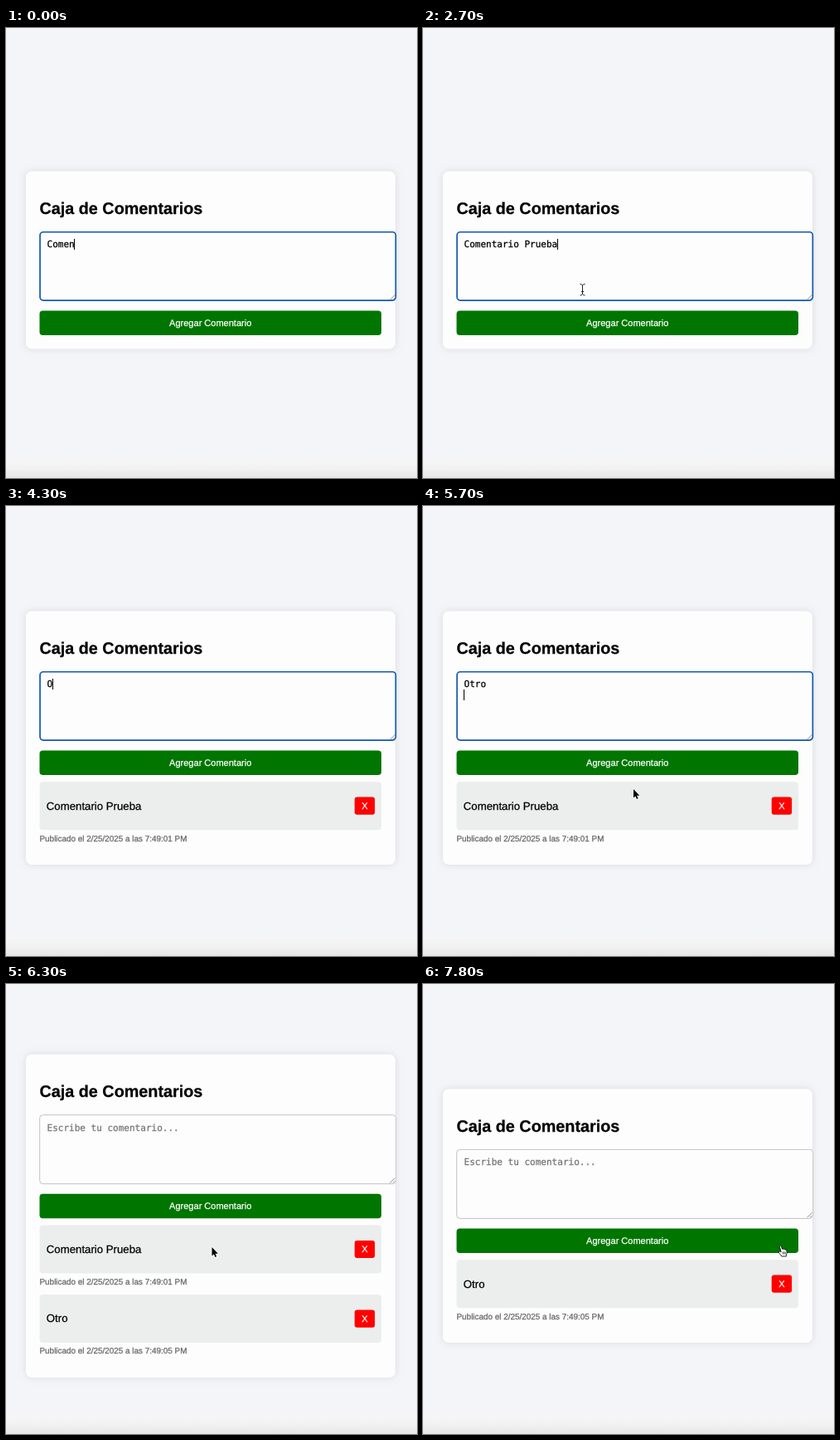
Recreate the animation shown at these times as an HTML page with a canvas. Size 496x542 px, loop 8 s.

```html
<!DOCTYPE html>
<html lang="es">
<head>
<meta charset="utf-8">
<title>Caja de Comentarios</title>
<style>
html, body { margin: 0; width: 100%; height: 100%; overflow: hidden; background: #f4f5f9; }
canvas { display: block; }
</style>
</head>
<body>
<canvas id="stage" width="496" height="542"></canvas>
<script>
const ctx = document.getElementById('stage').getContext('2d');
const LOOP = 8000;
const SANS = '"Liberation Sans", Arial, sans-serif';
const MONO = '"DejaVu Sans Mono", monospace';
ctx.textRendering = 'geometricPrecision';

// Each track is a list of [start, ...values]; values hold until the next entry.
const layouts = [
  [0, 172.5, []],
  [3000, 126.5, [['Comentario Prueba', '01']]],
  [6100, 84.8, [['Comentario Prueba', '01'], ['Otro', '05']]],
  [7700, 126.5, [['Otro', '05']]]
];
const focus = [[0, true], [2900, false], [3600, true], [6000, false]];
const first = 'Comentario Prueba';
const typed = [
  [0, first.slice(0, 5)],
  ...[200, 600, 700, 900, 1000, 1100, 1600, 1900, 2100, 2300, 2400, 2500]
    .map((t, i) => [t, first.slice(0, 6 + i)]),
  [3000, ''], [4200, 'O'], [4800, 'Ot'], [5000, 'Otr'], [5100, 'Otro'],
  [5400, 'Otro\n'], [6100, '']
];
const pointer = [
  [0, ''], [2700, 'beam', 192, 315], [2800, 'hand', 182, 345], [2900, 'hand', 178, 352],
  [3100, 'arrow', 176, 349], [3500, 'arrow', 179, 330], [3600, 'beam', 188, 278],
  [3700, 'beam', 191, 271], [4200, ''],
  [5700, 'arrow', 254, 341], [5800, 'arrow', 251, 332], [5900, 'hand', 249, 318],
  [6000, 'hand', 248, 316], [6200, 'arrow', 248.5, 317],
  [6600, 'arrow', 302, 321], [6700, 'arrow', 368, 329], [6800, 'arrow', 409, 333],
  [7000, 'arrow', 412, 331], [7100, 'arrow', 416, 327], [7200, 'hand', 426, 318],
  [7300, 'hand', 430, 316], [7400, 'hand', 431, 315], [7500, 'hand', 432, 315]
];

const at = (track, t) => track.findLast(entry => entry[0] <= t).slice(1);

function box(x, y, w, h, r, fill) {
  ctx.beginPath();
  ctx.roundRect(x, y, w, h, r);
  ctx.fillStyle = fill;
  ctx.fill();
}

// The hairline stroke gives the slightly heavy look of smoothed text.
function text(str, x, y, font, color, align = 'left') {
  ctx.font = font;
  ctx.fillStyle = ctx.strokeStyle = color;
  ctx.lineWidth = .25;
  ctx.textAlign = align;
  ctx.fillText(str, x, y);
  ctx.strokeText(str, x, y);
}

function line(color, width, ...points) {
  ctx.strokeStyle = color;
  ctx.lineWidth = width;
  ctx.beginPath();
  for (let i = 0; i < points.length; i += 2) ctx.lineTo(points[i], points[i + 1]);
  ctx.stroke();
}

const background = ctx.createLinearGradient(0, 512, 0, 542);
[[0, '#f4f5f9'], [.35, '#f5f5f6'], [.65, '#f1f1f2'], [1, '#e6e6e8']]
  .forEach(stop => background.addColorStop(...stop));

function drawField(top, value, focused) {
  const y = top + 72.4;
  const border = focused ? 1.7 : 1;
  box(40.2, y, 431, 84, 4, '#fdfdfd');
  ctx.beginPath();
  ctx.roundRect(40.2 + border / 2, y + border / 2, 431 - border, 84 - border, 4);
  ctx.strokeStyle = focused ? '#1259b0' : '#c2c2c4';
  ctx.lineWidth = border;
  ctx.stroke();
  line('#777', .8, 463.5, y + 82.4, 469.5, y + 76.4);
  line('#777', .8, 467, y + 82.4, 469.5, y + 79.9);

  const font = '11.02px ' + MONO;
  const rows = value.split('\n');
  if (value) rows.forEach((row, i) => text(row, 49.5, y + 19.3 + 13 * i, font, '#000'));
  else text('Escribe tu comentario...', 49.5, y + 19.3, font, '#757575');
  if (focused) {
    const last = rows.length - 1;
    ctx.font = font;
    ctx.fillStyle = '#000';
    ctx.fillRect(Math.round(49 + ctx.measureText(rows[last]).width), Math.round(y + 9 + 12.8 * last), 1, 13);
  }
}

function drawComment(top, [message, seconds]) {
  box(40.5, top, 412.5, 58, 4, '#eceeee');
  text(message, 48.8, top + 33.3, '13.23px ' + SANS, '#000');
  box(420.7, top + 18.4, 24.4, 21.2, 3, '#f00');
  text('X', 433, top + 32.8, '11.02px ' + SANS, '#fff', 'center');
  text(`Publicado el 2/25/2025 a las 7:49:${seconds} PM`, 40.5, top + 71.3, '9.92px ' + SANS, '#666');
}

const arrow = new Path2D('M0 0V10.6L2.4 8.4L4 12L5.6 11.3L4.1 7.8H7.4Z');
const hand = new Path2D('M-1.6 1.2Q-1.4-.6 0-.2L1.6 4.4Q2.6 3.4 3.4 4.6Q4.4 3.8 5.1 5Q6.6 4.6 6.9 6.2' +
  'Q7.8 9.6 6.4 11.2V13H.9Q-.6 10.8-2.6 8.6Q-3.4 6.8-1.4 7L.1 7.8Z');

function drawPointer(kind, x, y) {
  if (!kind) return;
  ctx.save();
  ctx.translate(x, y);
  ctx.lineJoin = 'round';
  if (kind === 'beam') {
    line('#222', 1, .5, -5.5, .5, 6);
    line('#222', 1, -2.5, -6.5, -.8, -6.2, .5, -5, 1.8, -6.2, 3.5, -6.5);
    line('#222', 1, -2.5, 7, -.8, 6.7, .5, 5.5, 1.8, 6.7, 3.5, 7);
    line('#222', 1, -1, 2.5, 2, 2.5);
  } else if (kind === 'arrow') {
    ctx.strokeStyle = '#fff';
    ctx.lineWidth = 1.6;
    ctx.stroke(arrow);
    ctx.fillStyle = '#000';
    ctx.fill(arrow);
  } else {
    ctx.fillStyle = '#fff';
    ctx.fill(hand);
    ctx.strokeStyle = '#111';
    ctx.lineWidth = .9;
    ctx.stroke(hand);
    for (const gap of [2.2, 3.8, 5.2]) line('#111', .7, gap, 7.5, gap, 10.5);
  }
  ctx.restore();
}

function draw(t) {
  const [top, comments] = at(layouts, t);
  ctx.fillStyle = background;
  ctx.fillRect(0, 0, 496, 542);

  ctx.shadowColor = 'rgba(0,0,0,.1)';
  ctx.shadowBlur = 8;
  box(24, top, 445.8, 214 + (comments.length ? 8 : 0) + 83.6 * comments.length, 7, '#fdfdfd');
  ctx.shadowColor = 'transparent';

  text('Caja de Comentarios', 40.5, top + 51.3, 'bold 19.8px ' + SANS, '#000');
  drawField(top, at(typed, t)[0], at(focus, t)[0]);
  box(40.5, top + 168, 412.5, 29.4, 4, '#007500');
  text('Agregar Comentario', 246.7, top + 186.5, '11.02px ' + SANS, '#fff', 'center');
  comments.forEach((comment, i) => drawComment(top + 205.7 + 83.6 * i, comment));
  drawPointer(...at(pointer, t));
}

function frame(now) {
  draw(now % LOOP);
  requestAnimationFrame(frame);
}
draw(0);
requestAnimationFrame(frame);
</script>
</body>
</html>
```
